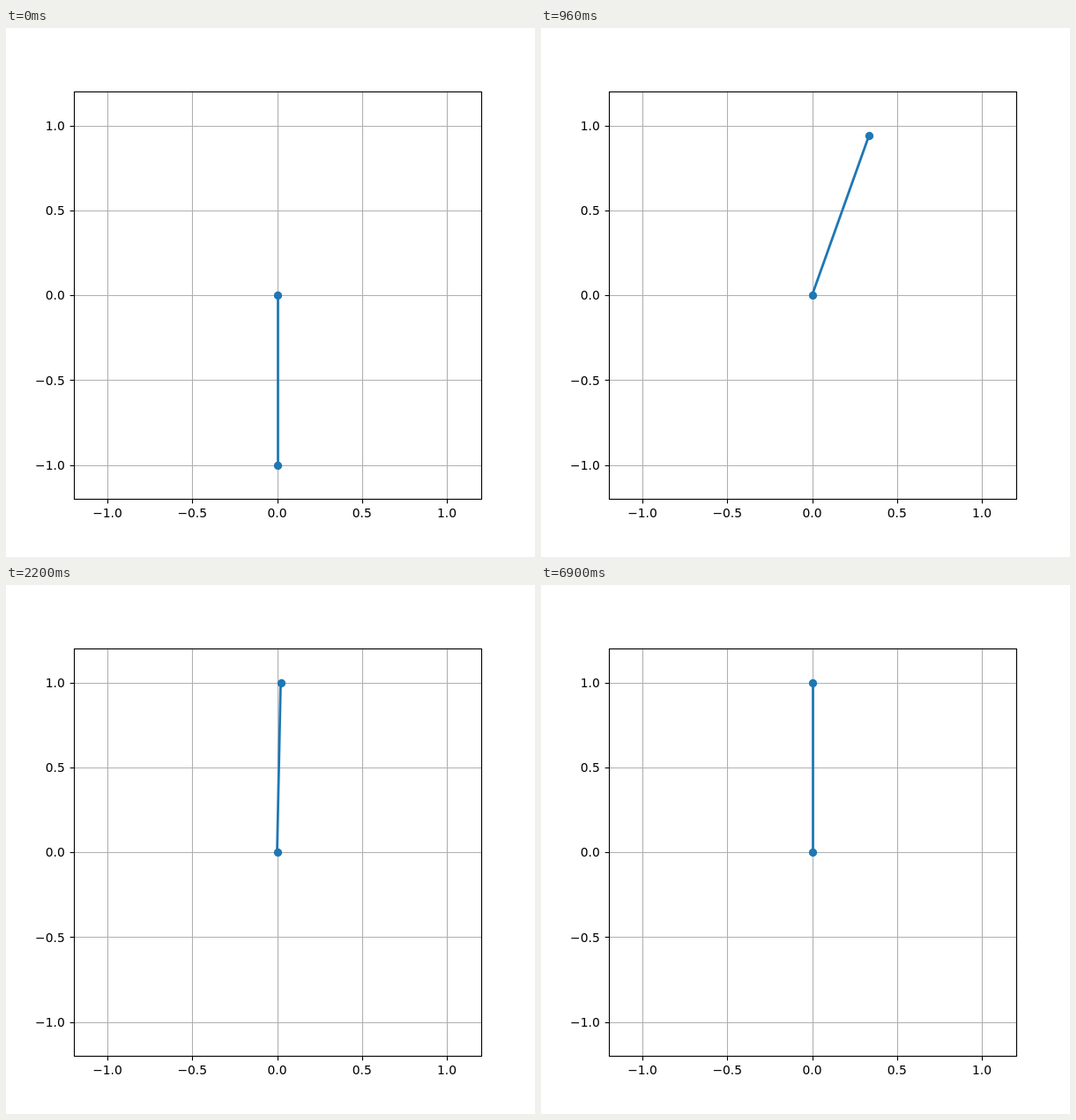
Animation of 600x600 px, one loop 10 s. Source, as an HTML page with a canvas:

```html
<!DOCTYPE html>
<html lang="en">
<head>
<meta charset="utf-8">
<title>Pendulum swing-up</title>
<style>
  html, body { margin: 0; width: 100%; height: 100%; overflow: hidden; background: #fff; }
  canvas { display: block; }
</style>
</head>
<body>
<canvas id="stage" width="600" height="600"></canvas>
<script>
const ctx = document.getElementById('stage').getContext('2d');

const LOOP = 10000, FRAME = 20, REST = 6900;
const CX = 307.5, CY = 303, UNIT = 192.5;
const BOX = { left: 77.5, top: 72.5, right: 539.5, bottom: 534.5 };
const TICKS = [-1, -0.5, 0, 0.5, 1];
const THIN = 1.111, TICK = 4.86;
const BLUE = '#1f77b4';

// Inverted pendulum under PD control, angle measured from upright.
const GRAVITY = 10, KP = 50, KD = 20;
const angles = simulate(LOOP / FRAME, FRAME / 1000, 20);

function simulate(count, dt, substeps) {
  const h = dt / substeps;
  const accel = (a, w) => GRAVITY * Math.sin(a) - KP * a - KD * w;
  const out = [];
  let a = Math.PI, w = 0;
  for (let i = 0; i < count; i++) {
    out.push(a);
    for (let j = 0; j < substeps; j++) {
      const midA = a + w * h / 2;
      const midW = w + accel(a, w) * h / 2;
      a += midW * h;
      w += accel(midA, midW) * h;
    }
  }
  return out;
}

const snap = v => Math.floor(v + 0.5) + 0.5;

function segment(x1, y1, x2, y2, color, width) {
  ctx.strokeStyle = color;
  ctx.lineWidth = width;
  ctx.beginPath();
  ctx.moveTo(x1, y1);
  ctx.lineTo(x2, y2);
  ctx.stroke();
}

function dot(x, y) {
  ctx.fillStyle = BLUE;
  ctx.beginPath();
  ctx.arc(snap(x), snap(y), 4.69, 0, 2 * Math.PI);
  ctx.fill();
}

function drawGrid() {
  for (const v of TICKS) {
    const x = snap(CX + v * UNIT), y = snap(CY - v * UNIT);
    segment(x, BOX.top, x, BOX.bottom, '#b0b0b0', THIN);
    segment(BOX.left, y, BOX.right, y, '#b0b0b0', THIN);
  }
}

function drawAxes() {
  ctx.font = '13.889px "DejaVu Sans", sans-serif';
  ctx.fillStyle = '#000';
  for (const v of TICKS) {
    const x = CX + v * UNIT, y = CY - v * UNIT;
    const label = v.toFixed(1).replace('-', '\u2212');
    segment(snap(x), BOX.bottom, snap(x), BOX.bottom + TICK, '#000', THIN);
    segment(BOX.left, snap(y), BOX.left - TICK, snap(y), '#000', THIN);
    ctx.textAlign = 'center';
    ctx.fillText(label, x, 555);
    ctx.textAlign = 'right';
    ctx.fillText(label, 66.8, Math.round(y + 5.28));
  }
  ctx.strokeStyle = '#000';
  ctx.lineWidth = THIN;
  ctx.strokeRect(BOX.left, BOX.top, BOX.right - BOX.left, BOX.bottom - BOX.top);
}

function drawPendulum(time) {
  const angle = angles[Math.floor(time / FRAME)];
  const x = CX + UNIT * Math.sin(angle), y = CY - UNIT * Math.cos(angle);
  // An exactly vertical rod sits on the pixel grid.
  const vertical = time < FRAME || time >= REST;
  const fit = vertical ? snap : v => v;
  segment(fit(CX), fit(CY), fit(x), fit(y), BLUE, 2.778);
  dot(CX, CY);
  dot(x, y);
}

function draw(time) {
  ctx.fillStyle = '#fff';
  ctx.fillRect(0, 0, 600, 600);
  drawGrid();
  drawPendulum(time);
  drawAxes();
}

const start = performance.now();
function tick() {
  draw((performance.now() - start) % LOOP);
  requestAnimationFrame(tick);
}
tick();
</script>
</body>
</html>
```
